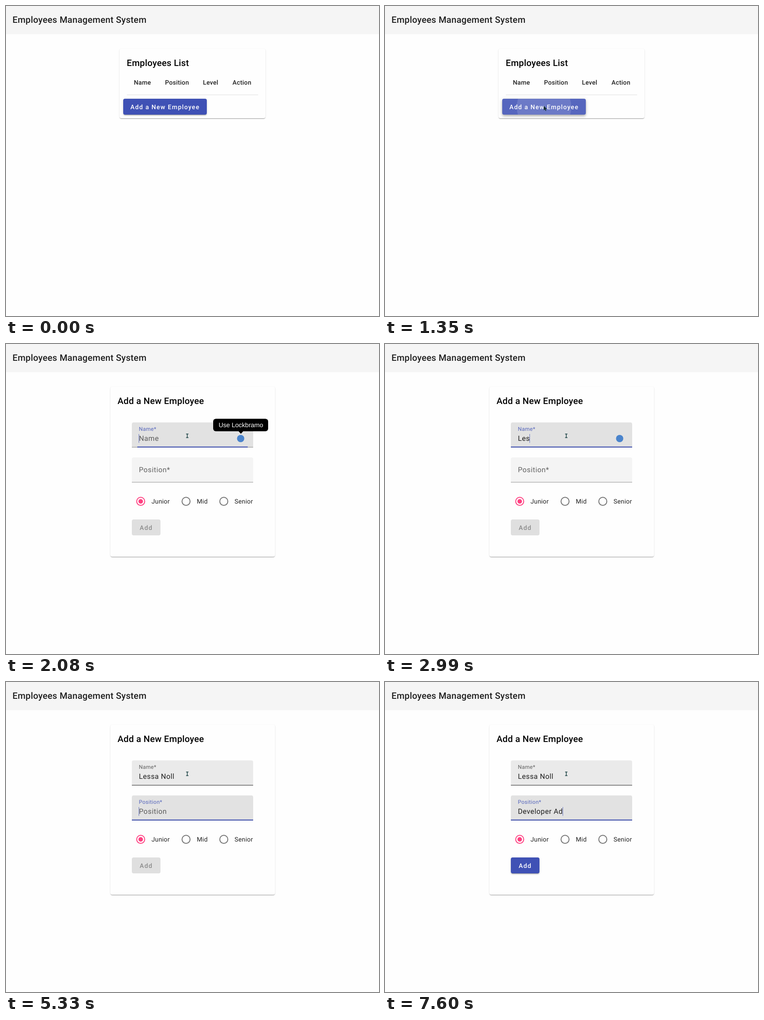
An HTML page that plays this animation: 821 by 682 pixels, repeating every 8000 ms.

```html
<!DOCTYPE html>
<html lang="en">
<head>
<meta charset="utf-8">
<title>Employees Management System</title>
<style>
  html, body { margin: 0; width: 100%; height: 100%; overflow: hidden; background: #fefefe; }
  #stage { position: relative; width: 821px; height: 682px; overflow: hidden; }
  #bar { position: absolute; left: 0; top: 0; width: 821px; height: 62px; background: #f5f5f5; }
  .card, .btn { position: absolute; border-radius: 4px; }
  .card {
    background: #fefefe;
    box-shadow: 0 2px 1px -1px rgba(0,0,0,.2), 0 1px 1px rgba(0,0,0,.14), 0 1px 3px rgba(0,0,0,.12);
  }
  .btn { background: #3f51b5; }
  .raised { box-shadow: 0 3px 1px -2px rgba(0,0,0,.2), 0 2px 2px rgba(0,0,0,.14), 0 1px 5px rgba(0,0,0,.12); }
  .lifted { box-shadow: 0 2px 4px -1px rgba(0,0,0,.2), 0 4px 5px rgba(0,0,0,.14), 0 1px 10px rgba(0,0,0,.12); }
  svg { position: absolute; left: 0; top: 0; }
  text {
    font-family: Roboto, sans-serif; fill: rgba(0,0,0,.87); white-space: pre;
    text-rendering: geometricPrecision;
  }
  .title { font-size: 19.71px; font-weight: 500; letter-spacing: .0125em; }
  .head { fill: #000; }
  .th, .opt { font-size: 13.8px; letter-spacing: .0178em; }
  .th { font-weight: 500; }
  .cta { font-size: 13.8px; font-weight: 500; letter-spacing: .0893em; fill: #fff; }
  .inp { font-size: 15.77px; letter-spacing: .03125em; }
  .dim { fill: rgba(0,0,0,.6); }
  .tip { font: 14px "Liberation Sans", Arial, sans-serif; fill: #fff; }
</style>
</head>
<body>
<div id="stage">
  <div id="bar"></div>

  <div id="listBoxes">
    <div class="card" style="left:250px;top:94px;width:321px;height:153px"></div>
    <div class="btn raised" id="newBtn" style="left:258px;top:204px;width:184px;height:35px"></div>
  </div>
  <div id="formBoxes">
    <div class="card" style="left:229.5px;top:94px;width:362px;height:374px"></div>
    <div class="btn" id="addBtn" style="left:277px;top:386px;width:63px;height:35px"></div>
  </div>

  <svg width="821" height="682" viewBox="0 0 821 682">
    <defs>
      <clipPath id="btnClip"><rect x="258" y="204" width="184" height="35" rx="4"/></clipPath>
    </defs>
    <text class="title" x="14.3" y="37.2">Employees Management System</text>

    <g id="list">
      <text class="title head" x="265.8" y="132">Employees List</text>
      <text class="th" x="281.5" y="173">Name</text>
      <text class="th" x="350" y="173">Position</text>
      <text class="th" x="433.5" y="173">Level</text>
      <text class="th" x="498.6" y="173">Action</text>
      <rect x="266" y="195" width="289" height="1" fill="#000" fill-opacity=".12"/>
      <g clip-path="url(#btnClip)" fill="#fff">
        <rect id="press" x="258" y="204" width="184" height="36"/>
        <circle id="ripple" cx="350" cy="222" r="0" fill-opacity=".13"/>
      </g>
      <text class="cta" x="273.8" y="226.7">Add a New Employee</text>
    </g>

    <g id="form">
      <text class="title head" x="245.5" y="132">Add a New Employee</text>
      <g id="fields"></g>
      <g id="radios"></g>
      <text class="cta" id="addText" x="294.3" y="408.5">Add</text>
      <circle id="badge" cx="516.5" cy="208" r="8" fill="#4a84cc"/>
      <g id="tip">
        <path d="M511 191h12l-6 6.5z"/>
        <rect x="456" y="164.5" width="121" height="27.5" rx="6"/>
        <text class="tip" x="468" y="183">Use Lockbramo</text>
      </g>
    </g>

    <path id="arrow" d="M0 0v10l2.3-2 1.7 3.6 1.6-.8-1.6-3.5h3z" fill="#16302f"/>
    <path id="beam" d="M-2.6-4h5.2M0-4v8M-2.6 4h5.2" fill="none" stroke="#1a4143" stroke-width="1.5"/>
  </svg>
</div>

<script>
const LOOP = 8000, FRAME = 200 / 3, PRIMARY = '#3f51b5';
const OPEN = 1410, NAME_FOCUS = 2010, POS_FOCUS = 4250, VALID = 6520;
const $ = id => document.getElementById(id);
const lerp = (a, b, p) => a + (b - a) * p;
const clamp = v => Math.min(1, Math.max(0, v));
const show = (el, on) => { el.style.display = on ? '' : 'none'; };
const set = (el, attrs) => { for (const k in attrs) el.setAttribute(k, attrs[k]); };

// Value of the last [time, value] step reached.
function step(table, t, before = 0) {
  let v = before;
  for (const [at, value] of table) if (t >= at) v = value;
  return v;
}

// Steps after a field gains or loses focus.
const LINE = [[0, .3], [70, .91], [140, 1]];
const FLOAT = [[0, .45], [70, 1]];
const SHADE = [[0, .5], [70, 1]];
const FADE = [[0, .6], [70, .25], [140, 0]];

const FIELDS = [
  { name: 'Name', top: 172.4, focus: NAME_FOCUS, blur: POS_FOCUS, hover: true,
    value: 'Lessa Noll',
    keys: [2800, 2930, 2990, 3200, 3330, 3400, 3660, 3790, 3990, 4050],
    blink: [2530, 2800] },
  { name: 'Position', top: 249.4, focus: POS_FOCUS, blur: Infinity, hover: false,
    value: 'Developer Ad',
    keys: [5590, 5790, 5990, 6190, 6520, 6660, 6870, 6930, 7000, 7200, 7330, 7600],
    blink: [4790, 5330] }
];

const X = 292.5, HEIGHT = 55.2;

function buildField(f) {
  const y = f.top, bottom = y + HEIGHT;
  const g = document.createElementNS('http://www.w3.org/2000/svg', 'g');
  g.innerHTML = `
    <path d="M277 ${bottom}V${y + 4}q0-4 4-4H540q4 0 4 4V${bottom}z"/>
    <rect x="277" y="${bottom - 1}" width="267" height="1"/>
    <rect y="${bottom - 2}" height="2" fill="${PRIMARY}"/>
    <text class="inp"></text>
    <text class="inp dim" x="${X}" y="${y + 41}">${f.name}</text>
    <text class="inp" x="${X}" y="${y + 41}"></text>
    <rect y="${y + 25.6}" width="1" height="19.5" fill="${PRIMARY}" fill-opacity=".75"/>`;
  [f.bg, f.base, f.line, f.label, f.hint, f.text, f.caret] = g.children;
  f.label.textContent = f.name + '*';
  $('fields').append(g);
}

function drawField(f, t) {
  const since = t - f.focus, gone = t - f.blur;
  const active = since >= 0 && gone < 0;
  const idle = f.hover ? .078 : .04;
  const shade = active ? step(SHADE, since) : gone >= 0 ? 1 - step(SHADE, gone) : 0;
  const lift = step(FLOAT, since);
  const width = 267 * step(LINE, since);
  const count = f.keys.filter(k => t >= k).length;

  set(f.bg, { 'fill-opacity': lerp(idle, .11, shade) });
  set(f.base, { 'fill-opacity': f.hover && !active ? .87 : .42 });
  set(f.line, { x: 410.5 - width / 2, width, opacity: step(FADE, gone, 1) });
  set(f.label, { transform: `translate(${X} ${f.top + lerp(33, 18.8, lift)}) scale(${lerp(1, .75, lift)})` });
  f.label.style.fill = active ? 'rgba(63,81,181,.87)' : 'rgba(0,0,0,.6)';
  show(f.hint, active && !count && lift === 1);

  const typed = f.value.slice(0, count);
  if (f.text.textContent !== typed) f.text.textContent = typed;
  const end = count ? f.text.getComputedTextLength() : 0;
  set(f.caret, { x: Math.floor(X + end) });
  show(f.caret, active && !(t >= f.blink[0] && t < f.blink[1]));
}

function buildRadios() {
  const options = [['Junior', 296.5], ['Mid', 396.3], ['Senior', 479.4]];
  $('radios').innerHTML = options.map(([label, x], i) => `
    <circle cx="${x}" cy="346.2" r="8.87" fill="none" stroke-width="1.97" stroke="${i ? '#757575' : '#ff4081'}"/>
    ${i ? '' : `<circle cx="${x}" cy="346.2" r="5" fill="#ff4081"/>`}
    <text class="opt" x="${x + 23.7}" y="351">${label}</text>`).join('');
}

function drawCursor(t) {
  const inForm = t >= OPEN;
  show($('arrow'), !inForm && t >= 330);
  show($('beam'), inForm);
  const p = clamp(Math.floor((t - 330) / FRAME + .01) / 12);
  const e = 1 - (1 - p) ** 2;
  set($('arrow'), { transform: `translate(${lerp(534, 349.5, e)} ${lerp(672, 219.5, e)})` });
  const q = step([[1740, .35], [1800, .8], [1870, 1]], t);
  set($('beam'), { transform: `translate(${lerp(353, 399, q)} ${lerp(225, 202, q)})` });
}

function drawList(t) {
  set($('press'), { 'fill-opacity': step([[1200, .08], [1270, .12]], t) });
  set($('ripple'), { r: step([[1270, 25], [1340, 60]], t) });
  $('newBtn').className = 'btn ' + (t >= 1270 ? 'lifted' : 'raised');
}

function drawAdd(t) {
  const on = t >= VALID, a = step([[6520, .15], [6590, .5], [6660, .85], [6730, 1]], t);
  const btn = $('addBtn').style;
  btn.background = on ? PRIMARY : 'rgba(0,0,0,.12)';
  btn.boxShadow = `0 3px 1px -2px rgba(0,0,0,${.2 * a}), 0 2px 2px rgba(0,0,0,${.14 * a}), 0 1px 5px rgba(0,0,0,${.12 * a})`;
  $('addText').style.fill = on ? '#fff' : 'rgba(0,0,0,.38)';
}

function render(t) {
  const inForm = t >= OPEN;
  for (const id of ['list', 'listBoxes']) show($(id), !inForm);
  for (const id of ['form', 'formBoxes']) show($(id), inForm);
  if (inForm) {
    FIELDS.forEach(f => drawField(f, t));
    show($('badge'), t >= NAME_FOCUS && t < POS_FOCUS);
    show($('tip'), t >= NAME_FOCUS + 70 && t < 2800);
    drawAdd(t);
  } else {
    drawList(t);
  }
  drawCursor(t);
}

FIELDS.forEach(buildField);
buildRadios();
const start = performance.now();
function tick() {
  render((performance.now() - start) % LOOP);
  requestAnimationFrame(tick);
}
tick();
</script>
</body>
</html>
```
